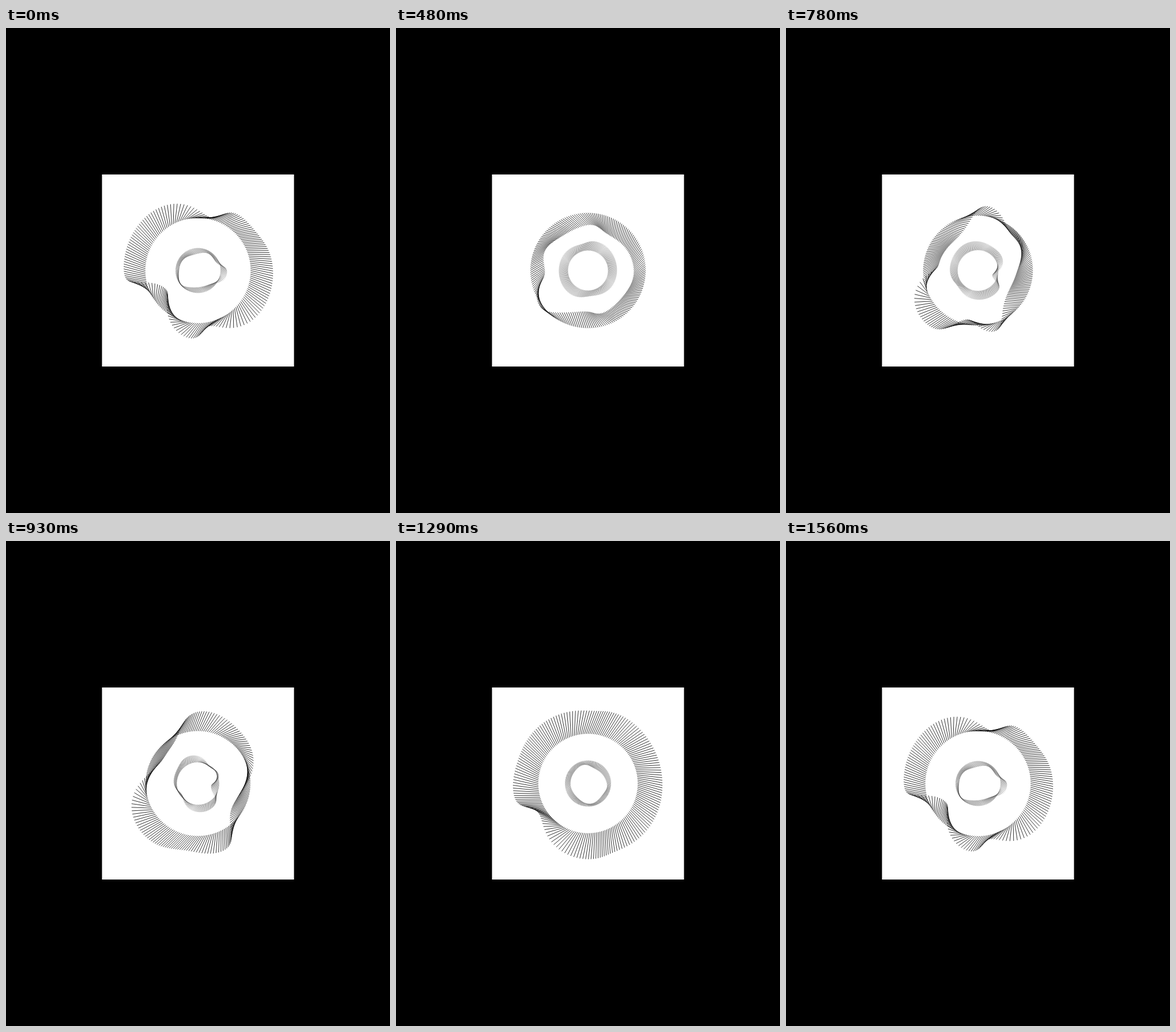
An HTML page with a canvas that plays this animation: 666x841 px, repeating every 1.59 s.

```html
<!DOCTYPE html>
<html lang="en">
<head>
<meta charset="utf-8">
<title>Swaying rings</title>
<style>
  html, body { margin: 0; width: 100%; height: 100%; overflow: hidden; background: #000; }
  canvas { display: block; }
</style>
</head>
<body>
<canvas id="stage" width="666" height="841"></canvas>
<script>
const ctx = document.getElementById('stage').getContext('2d');
const LOOP = 1590, STEP = 30, STEPS = 51;
const SIZE = 333, LINES = 180, TAU = Math.PI * 2;
const SWAY = 0.6;   // sideways lean of a half-extended spoke
const LEAD = 0.17;  // average angle by which a tip runs ahead of its foot

// A lobe swells and sinks once per loop: angle and spread in degrees, height, moment of its peak.
const lobe = (angle, spread, height, peak) =>
  ({ angle: angle * TAU / 360, sharp: (360 / TAU / spread) ** 2, height, peak });

// The foot circle breathes around `radius`; tips stay within `reach`.
const rings = [
  {
    radius: 93, breath: 7, peak: 0.29, reach: 0.4 * SIZE,
    rest: 0.25, swing: 1.25, width: 0.85, color: '#111',
    lobes: [
      lobe(5, 22, 1, 0.08),
      lobe(35, 16, 0.75, 0.02),
      lobe(73, 12, 0.55, 0.5),
      lobe(95, 10, 0.5, 0.85),
      lobe(142, 18, 1.6, 0.43),
      lobe(178, 10, 0.5, 0.9),
      lobe(202, 20, 1.05, 0.1),
      lobe(235, 16, 0.7, 0),
      lobe(280, 14, 0.7, 0.47),
      lobe(300, 14, 0.5, 0.85)
    ]
  },
  {
    radius: 37.2, breath: 2.8, peak: 0.86, reach: 0.16 * SIZE,
    rest: 0.15, swing: 1.15, width: 0.42, color: '#333',
    lobes: [
      lobe(8, 16, 1.7, 0.04),
      lobe(80, 25, 0.9, 0.68),
      lobe(140, 18, 0.6, 0.1),
      lobe(255, 20, 0.8, 0.65),
      lobe(300, 18, 0.7, 0.2)
    ]
  }
];

const wave = (time, peak) => Math.cos(TAU * (time - peak));

// From -1 (spoke points inwards) to 1 (spoke points outwards).
function extension(ring, angle, time) {
  let sum = ring.rest - ring.swing * wave(time, ring.peak);
  for (const l of ring.lobes) {
    sum += l.height * wave(time, l.peak) * Math.exp(l.sharp * (Math.cos(angle - l.angle) - 1));
  }
  return Math.tanh(sum);
}

function drawRing(ring, time) {
  const r = ring.radius + ring.breath * wave(time, ring.peak);
  const len = ring.reach - r;
  ctx.beginPath();
  for (let i = 0; i < LINES; i++) {
    const a = i / LINES * TAU, cos = Math.cos(a), sin = Math.sin(a);
    const ext = extension(ring, a + LEAD, time);
    const out = r + len * ext;
    const side = SWAY * len * Math.sqrt(1 - ext * ext);
    ctx.moveTo(r * cos, r * sin);
    ctx.lineTo(out * cos - side * sin, out * sin + side * cos);
  }
  ctx.lineWidth = ring.width;
  ctx.strokeStyle = ring.color;
  ctx.stroke();
}

function frame() {
  const tick = Math.floor(performance.now() % LOOP / STEP);
  const time = Math.max(0, tick - 1) / STEPS;
  ctx.setTransform(1, 0, 0, 1, 0, 0);
  ctx.fillStyle = '#000';
  ctx.fillRect(0, 0, 666, 841);
  ctx.translate(333, 420.5);
  ctx.fillStyle = '#fff';
  ctx.fillRect(-SIZE / 2, -SIZE / 2, SIZE, SIZE);
  rings.forEach(ring => drawRing(ring, time));
  requestAnimationFrame(frame);
}
frame();
</script>
</body>
</html>
```
